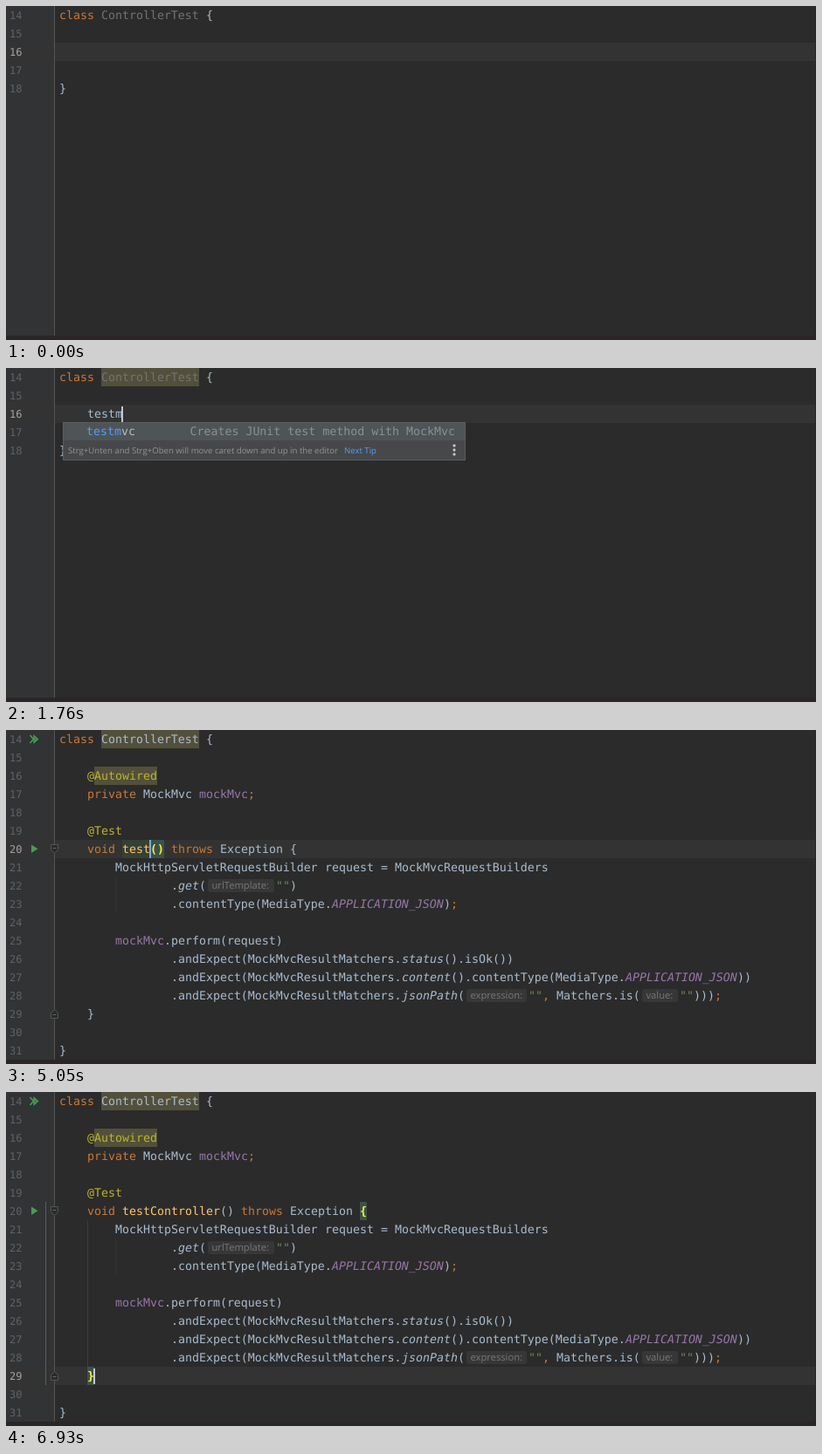
An HTML page that plays this animation: 927 by 383 pixels, repeating every 7960 ms.

```html
<!DOCTYPE html>
<html lang="en">
<head>
<meta charset="utf-8">
<title>Live template in a code editor</title>
<style>
  html, body { margin: 0; width: 100%; height: 100%; overflow: hidden; background: #2b2b2b; }
  svg { display: block; width: 927px; height: 383px; }
  text { font: 13.288px "DejaVu Sans Mono", monospace; fill: #a9bccf; white-space: pre; text-rendering: geometricPrecision; }
  .num { font-size: 12px; fill: #606366; }
  .now { fill: #a4a3a3; }
  .key { fill: #cc7832; }
  .str { fill: #6a8759; }
  .note { fill: #bbb529; }
  .field { fill: #9876aa; }
  .const { fill: #9876aa; font-style: italic; }
  .static { font-style: italic; }
  .fn { fill: #ffc66d; }
  .dim { fill: #72737a; }
  .brace { fill: #ffef28; font-weight: bold; }
  .item { fill: #bbbbbb; }
  .desc { fill: #8f8f8f; text-anchor: end; }
  .match { fill: #589df6; }
  .tip { font: 9.62px "Open Sans", sans-serif; fill: #929394; }
  .link { fill: #589df6; }
  .hint { font: 11.2px "Open Sans", sans-serif; fill: #787878; }
</style>
</head>
<body>
<svg id="stage" viewBox="0 0 927 383" xmlns="http://www.w3.org/2000/svg"></svg>
<script>
const stage = document.getElementById('stage');
const LOOP = 7960, CELL = 8, ROW = 21, LEFT = 61;

const HINTS = { '<urlTemplate:>': 80, '<expression:>': 73, '<value:>': 45 };
const TOKENS = /(ControllerTest|class|private|void|throws|[;,]|""|@\w+|APPLICATION_JSON|mockMvc|get(?=\()|status|content(?=\()|jsonPath|test(?=\w*\()|Controller(?=\()|\(\)(?= throws)|[{}]$|<\w+:>| +)/;

const ITEMS = [
  ['test', 'Creates JUnit test'],
  ['testmvc', 'Creates JUnit test method with MockMvc'],
  ['testfile', 'Get file from resources for testing'],
  ['teardown', 'Creates JUnit teardown method'],
  ['tempfile', 'Creates temporary file for testing']
];

// Times at which each further character is typed.
const WORD_TIMES = [380, 840, 1150, 1230, 1760, 2010, 2310];
const NAME_TIMES = [5130, 5280, 5450, 5520, 5750, 5830, 5980, 6140, 6210, 6460];
const typed = (word, times, t) => word.slice(0, times.filter(at => t >= at).length);

const rect = (x, y, w, h, fill, more = '') =>
  `<rect x="${x}" y="${y}" width="${w}" height="${h}" fill="${fill}" ${more}/>`;
const label = (x, y, cls, s) => `<text x="${x}" y="${y}" class="${cls}">${s}</text>`;
const path = (d, fill, stroke = 'none', width = 1) =>
  `<path d="${d}" fill="${fill}" stroke="${stroke}" stroke-width="${width}"/>`;
const caret = (x, row) => rect(x - 1, row * ROW + 2, 2, 18, '#c4c8cc');

function stateAt(t) {
  const expanded = t >= 3390;
  return {
    expanded,
    word: typed('testmvc', WORD_TIMES, t),
    name: typed('Controller', NAME_TIMES, t),
    classLit: t >= 380,
    popup: t >= 920 && t < 3240,
    tip: t >= 1000,
    bulb: t >= 2860,
    colours: t >= 3710,
    extras: t >= 3800,
    resolved: t >= 4340,
    left: t >= 6610,
    renamed: t >= 6930,
    caret: expanded ? t < 5050 || t >= 5130 : t >= 380 && t < 3010,
    row: t >= 6610 ? 15 : expanded ? 6 : 2
  };
}

function sourceLines(s) {
  if (!s.expanded) return ['class ControllerTest {', '', '    ' + s.word, '', '}'];
  const chain = ' '.repeat(16);
  const expect = chain + '.andExpect(MockMvcResultMatchers.';
  const lines = [
    'class ControllerTest {', '',
    '    @Autowired',
    '    private MockMvc mockMvc;', '',
    '    @Test',
    `    void test${s.name}() throws Exception {`,
    '        MockHttpServletRequestBuilder request = MockMvcRequestBuilders',
    chain + '.get(<urlTemplate:>"")',
    chain + '.contentType(MediaType.APPLICATION_JSON);', '',
    '        mockMvc.perform(request)',
    expect + 'status().isOk())',
    expect + 'content().contentType(MediaType.APPLICATION_JSON))',
    expect + 'jsonPath(<expression:>"", Matchers.is(<value:>"")));',
    '    }', '', '}'
  ];
  return s.extras ? lines : lines.map(line => line.replace(/<\w+:>/g, ''));
}

function styleOf(token, row, s) {
  if (/^(class|private|void|throws|[;,])$/.test(token)) return 'key';
  if (token === '""') return 'str';
  if (token === 'ControllerTest') return s.resolved ? '' : 'dim';
  if (token === '()' && row === 6) return s.left ? '' : 'brace';
  if (/^[{}]$/.test(token)) return s.left && (row === 6 || row === 15) ? 'brace' : '';
  if (!s.colours) return '';
  if (token[0] === '@') return 'note';
  if (token === 'mockMvc') return 'field';
  if (token === 'APPLICATION_JSON') return 'const';
  if (/^(get|status|content|jsonPath)$/.test(token)) return 'static';
  if (token === 'test' || token === 'Controller' && s.renamed) return 'fn';
  return '';
}

function drawLine(line, row, s) {
  let x = LEFT, out = '';
  const top = row * ROW;
  for (const token of line.split(TOKENS)) {
    if (HINTS[token]) {
      out += rect(x + 2, top + 3, HINTS[token] - 4, 15, '#373737', 'rx="3"') +
        label(x + 6.5, top + 14, 'hint', token.slice(1, -1));
      x += HINTS[token];
      continue;
    }
    if (token.trim()) out += label(x, top + 15, styleOf(token, row, s), token);
    x += token.length * CELL;
  }
  return out;
}

function drawBase(s) {
  return rect(0, 0, 927, 383, '#2b2b2b') + rect(0, 0, 55, 383, '#313335') +
    rect(0, s.row * ROW, 927, ROW, '#323332') +
    rect(55, 0, 1, 383, '#555555') +
    rect(0, 378, 927, 5, '#2a2527') + rect(926, 0, 1, 383, '#28282a');
}

function drawMarks(s) {
  const end = 165 + s.name.length * CELL;
  let out = s.classLit ? rect(109, 0, 112, ROW, '#52503a') : '';
  if (!s.expanded) return out;
  if (s.resolved) out += rect(101, 42, 72, ROW, '#52503a');
  if (s.colours) {
    out += rect(125, 168, 1, 42, '#333333');
    if (!s.renamed) out += rect(133, 126, 32, ROW, '#344134');
  }
  if (s.left) {
    out += rect(405, 126, 8, ROW, '#3b514d') + rect(93, 315, 8, ROW, '#3b514d') +
      rect(45, 126, 1, 210, '#4f6560') + rect(93, 147, 1, 168, '#3c3c3c');
  } else {
    out += rect(end, 126, 16, ROW, '#3b514d');
  }
  return out;
}

function fold(y, flip) {
  const shape = flip ? `M51.5 ${y + 10.5}h8v-6l-4-4l-4 4z` : `M51.5 ${y + .5}h8v6l-4 4l-4-4z`;
  const mid = flip ? y + 6.5 : y + 4.5;
  return path(shape, '#2b2b2b', '#525456') + path(`M53.5 ${mid}h4`, 'none', '#626567');
}

function drawGutter(count, s) {
  let out = '';
  for (let i = 0; i < count; i++) {
    out += label(4, i * ROW + 15, i === s.row ? 'num now' : 'num', 14 + i);
  }
  if (s.extras) {
    out += path('M27.5 6l4 4.5l-4 4.5', 'none', '#499c54', 1.6) +
      path('M32 6.5l4.5 4l-4.5 4z', '#3f7d48', '#499c54', 1.3) +
      path('M29 131.5l7.5 4.75l-7.5 4.75z', '#499c54') + fold(131, false) + fold(320, true);
  }
  return out;
}

function drawCaret(s) {
  if (!s.expanded) return s.caret ? caret(93 + s.word.length * CELL, 2) : '';
  if (s.left) return caret(101, 15);
  const w = s.name.length * CELL;
  return rect(164.5, 126.5, w + 1, 20, 'none', 'stroke="#78a9dc"') +
    (s.caret ? caret(165 + w, 6) : '');
}

function drawPopup(s) {
  const n = s.word.length;
  const items = ITEMS.filter(([name]) => name.startsWith(s.word));
  const foot = 62 + items.length * 20, mid = foot + 12;
  let out = rect(65.5, 62.5, 460, foot + 23 - 62, '#46484a', 'stroke="#5a5d5f"') +
    rect(66, 63, 459, 20, '#4f5457');
  items.forEach(([name, desc], i) => {
    const y = 77 + i * 20;
    out += label(92, y, 'match', name.slice(0, n)) +
      label(92 + n * CELL, y, 'item', name.slice(n)) + label(514, y, 'desc', desc);
  });
  if (s.tip) {
    out += label(71, mid + 4, 'tip', 'Strg+Unten and Strg+Oben will move caret down and up in the editor') +
      label(387, mid + 4, 'tip link', 'Next Tip');
    for (const dy of [-5, 0, 5]) out += rect(511.5, mid + dy - 1.5, 3, 3, '#c3c5c7', 'rx="1"');
  }
  if (s.bulb) {
    out += `<circle cx="489" cy="${mid - 2}" r="5" fill="#f2a633"/>` +
      rect(486.5, mid + 1, 5, 3, '#f2a633') + rect(486.5, mid + 5, 5, 2, '#b9babb');
  }
  return out;
}

let shown = '';
function render(t) {
  const s = stateAt(t), key = JSON.stringify(s);
  if (key === shown) return;
  shown = key;
  const lines = sourceLines(s);
  stage.innerHTML = drawBase(s) + drawMarks(s) + drawGutter(lines.length, s) +
    lines.map((line, row) => drawLine(line, row, s)).join('') +
    drawCaret(s) + (s.popup ? drawPopup(s) : '');
}

const start = performance.now();
function tick() {
  render((performance.now() - start) % LOOP);
  requestAnimationFrame(tick);
}
tick();
</script>
</body>
</html>
```
